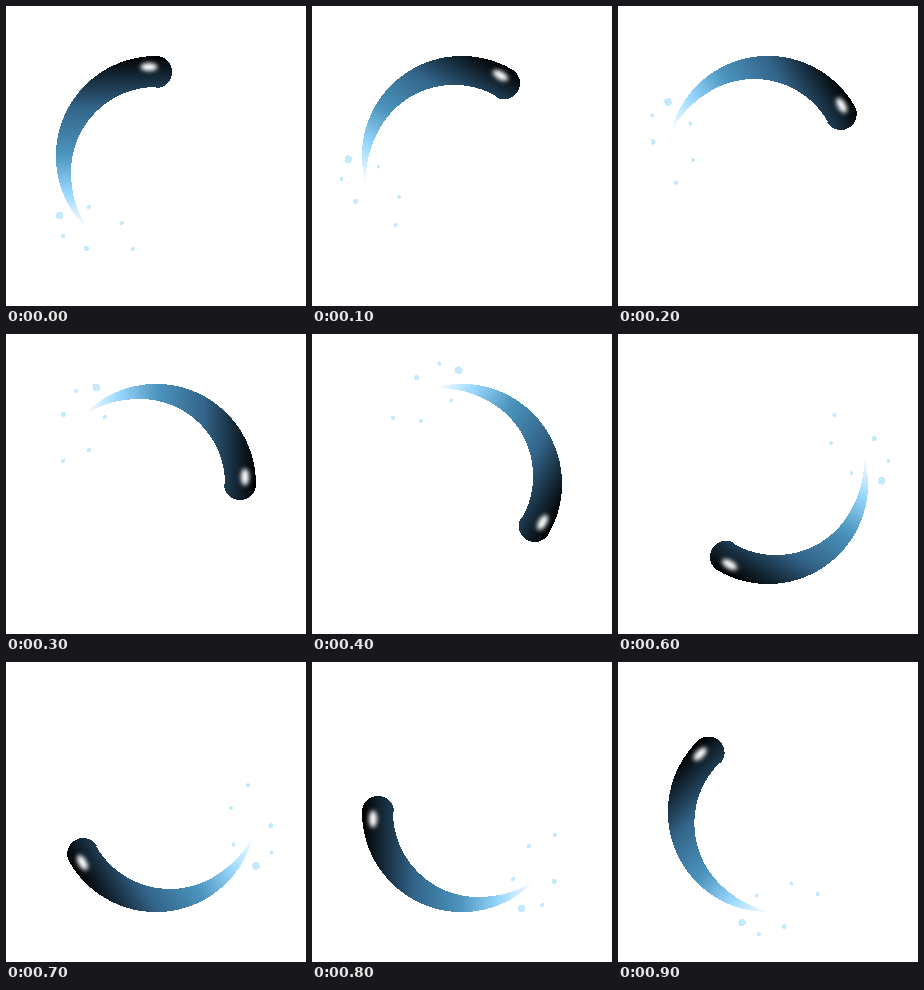
Write an HTML page that moves like this. It is 300 px wide and 300 px high and loops after 1 s.

```html
<!DOCTYPE html>
<html lang="en">
<head>
<meta charset="utf-8">
<title>Comet spinner</title>
<style>
  html, body { margin: 0; width: 100%; height: 100%; overflow: hidden; background: #fff; }
  svg { display: block; width: 100%; height: 100%; }
  path, .drops { shape-rendering: crispEdges; }
</style>
</head>
<body>
<svg viewBox="-150 -150 300 300">
  <defs>
    <linearGradient id="fade" gradientUnits="userSpaceOnUse" x1="0" y1="-100" x2="0" y2="72">
      <stop offset="0" stop-color="#000"/>
      <stop offset=".3" stop-color="#336489"/>
      <stop offset=".57" stop-color="#4b94bd"/>
      <stop offset=".8" stop-color="#9ad8ff"/>
      <stop offset="1" stop-color="#fff"/>
    </linearGradient>
    <filter id="soft" x="-50%" y="-100%" width="200%" height="300%">
      <feGaussianBlur stdDeviation="2"/>
    </filter>
  </defs>
  <g id="comet">
    <!-- outer arc, round head, inner arc, tapered tail -->
    <path fill="url(#fade)" d="M-68.5 73A100 100 0 0 1 0-100A16 16 0 0 1 0-68V-69A85 85 0 0 0-85 16Q-85 48-68.5 73Z"/>
    <ellipse cx="-7" cy="-89" rx="8.5" ry="4" fill="#fff" filter="url(#soft)"/>
    <g class="drops" fill="#c6eafd">
      <circle cx="-96.7" cy="59.6" r="3.8"/>
      <circle cx="-69.5" cy="92.4" r="2.6"/>
      <circle cx="-67" cy="51" r="2"/>
      <circle cx="-93" cy="80" r="2"/>
      <circle cx="-34" cy="67" r="2"/>
      <circle cx="-23" cy="93" r="2"/>
    </g>
  </g>
</svg>
<script>
  const LOOP = 1000, STEP = 100;
  const comet = document.getElementById('comet');

  // 30 degrees per step, with a longer leap on the sixth and ninth
  const angle = step => 30 * step + (step >= 6 ? 30 : 0) + (step >= 9 ? 15 : 0);

  function draw(now) {
    const step = Math.floor((now % LOOP) / STEP);
    comet.setAttribute('transform', `rotate(${angle(step)})`);
    requestAnimationFrame(draw);
  }

  draw(performance.now());
</script>
</body>
</html>
```
